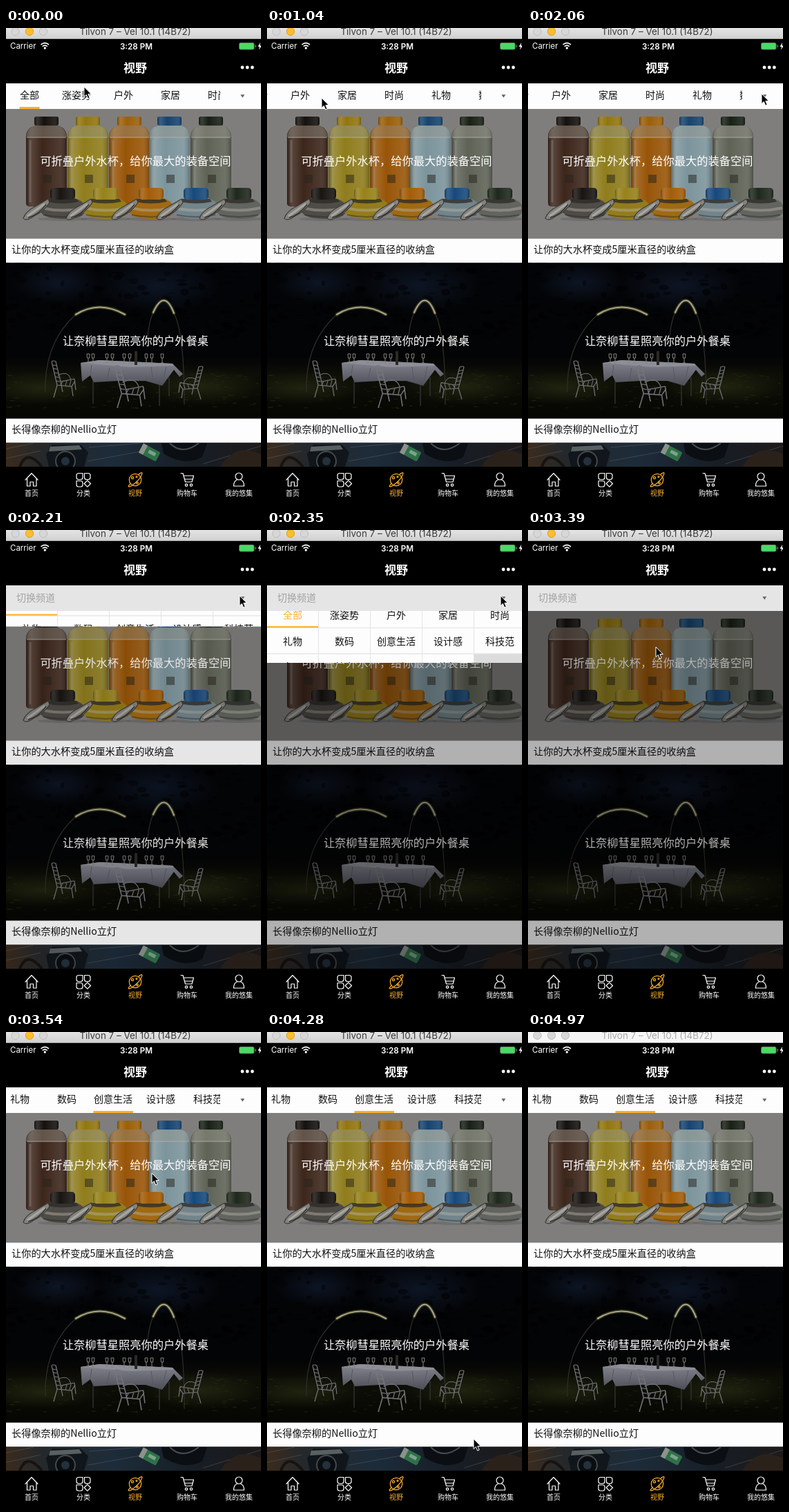
An HTML page for the animation above (4.99 s loop, 369 by 685 pixels).

```html
<!DOCTYPE html>
<html lang="zh-CN">
<head>
<meta charset="utf-8">
<title>视野</title>
<style>
html, body { margin: 0; width: 100%; height: 100%; overflow: hidden; background: #000; }
svg { display: block; width: 369px; height: 685px; }
text { font-family: "Noto Sans CJK SC", "Noto Sans CJK", sans-serif; font-size: 14px; fill: #111; }
.latin { font-family: Inter, Roboto, sans-serif; }
.mid { text-anchor: middle; }
.head { font-size: 16.25px; fill: #fff; text-anchor: middle; }
.cap { font-size: 14.2px; }
.label { font-size: 10px; fill: #fff; text-anchor: middle; }
.line { fill: none; stroke: #fff; stroke-width: 1.2; stroke-linejoin: round; stroke-linecap: round; }
.on { fill: #fbb02d; }
.line.on { fill: none; stroke: #fbb02d; }
</style>
</head>
<body>
<svg viewBox="0 0 369 685" xmlns="http://www.w3.org/2000/svg">
  <defs>
    <linearGradient id="bar" x2="0" y2="1"><stop stop-color="#e4e4e4"/><stop offset="1" stop-color="#cfcfcf"/></linearGradient>
    <linearGradient id="round">
      <stop stop-color="#000" stop-opacity=".3"/><stop offset=".14" stop-color="#fff" stop-opacity=".14"/>
      <stop offset=".4" stop-color="#fff" stop-opacity="0"/><stop offset=".84" stop-color="#fff" stop-opacity=".1"/><stop offset="1" stop-color="#000" stop-opacity=".22"/>
    </linearGradient>
    <linearGradient id="night" x2="0" y2="1">
      <stop stop-color="#030407"/><stop offset=".6" stop-color="#030405"/><stop offset=".72" stop-color="#0d0f07"/><stop offset="1" stop-color="#050602"/>
    </linearGradient>
    <radialGradient id="sky"><stop stop-color="#0d1524"/><stop offset="1" stop-color="#0d1524" stop-opacity="0"/></radialGradient>
    <radialGradient id="lawn"><stop stop-color="#20230f"/><stop offset="1" stop-color="#20230f" stop-opacity="0"/></radialGradient>
    <linearGradient id="cloth" x2="0" y2="1"><stop stop-color="#85868f"/><stop offset="1" stop-color="#4c4e58"/></linearGradient>
    <linearGradient id="desk"><stop stop-color="#3b2b1d"/><stop offset=".14" stop-color="#25282b"/><stop offset=".42" stop-color="#1d2c3a"/><stop offset=".75" stop-color="#171d25"/><stop offset="1" stop-color="#1d1a1a"/></linearGradient>
    <clipPath id="tabClip"><rect y="80" width="310" height="37"/></clipPath>
    <clipPath id="panelClip"><rect id="panelBox" y="117" width="369" height="0"/></clipPath>
    <clipPath id="photo2"><rect y="339" width="369" height="226"/></clipPath>
    <clipPath id="photo3"><rect y="599" width="369" height="35"/></clipPath>
    <g id="chair" fill="none" stroke="#75777c" stroke-width="1.2">
      <path d="M1 1Q3-1 7 1L14 30L34 26M1 1L9 35L30 37L35 29M9 35L4 53M30 37L32 51M14 30L17 45M34 26L36 42"/>
      <path d="M2 6L8 7M3 11L9 12M5 17L11 18M6 23L12 24M8 29L13 30M17 30L14 35M23 29L21 36M29 28L27 36M10 21Q25 13 29 27" stroke-width="1"/>
    </g>
  </defs>

  <g id="titlebar">
    <rect id="barBg" width="369" height="16" fill="url(#bar)"/>
    <path d="M0 15.5H369" stroke="#a9a9a9"/>
    <circle cx="13.5" cy="5" r="5.7" fill="#d7d7d7" stroke="#bdbdbd"/>
    <circle id="amber" cx="34" cy="5" r="5.7" fill="#fdbd2e" stroke="#dfa023"/>
    <circle cx="54" cy="5" r="5.7" fill="#d7d7d7" stroke="#bdbdbd"/>
    <text id="barText" class="latin mid" x="187" y="10" style="font-size:13.4px">Tilvon 7 – Vel 10.1 (14B72)</text>
  </g>

  <rect y="16" width="369" height="64"/>
  <text class="latin" x="6" y="30.3" style="font-size:11.5px;fill:#fff">Carrier</text>
  <g fill="none" stroke="#fff" stroke-width="1.7"><path d="M50.5 24.2Q56.3 19 62 24.2M52.8 26.7Q56.3 23.4 59.8 26.7"/><circle cx="56.3" cy="29" r=".8"/></g>
  <text class="latin mid" x="188.5" y="30.5" style="font-size:11.7px;font-weight:600;fill:#fff">3:28 PM</text>
  <rect x="337.5" y="21.5" width="21.5" height="9.5" rx="2" fill="#4cd964" stroke="#4f7a58"/>
  <path d="M361.2 24.5V28" stroke="#888" stroke-width="1.2"/>
  <path d="M368 21L364.5 27H367L366 31.5L370 25.5H367.5Z" fill="#fff"/>
  <text class="mid" x="187" y="63.7" style="font-size:17px;font-weight:700;fill:#fff">视野</text>
  <g fill="#fff"><circle cx="342" cy="57" r="2.4"/><circle cx="349.200" cy="57" r="2.4"/><circle cx="356.400" cy="57" r="2.4"/></g>

  <rect y="117" width="369" height="188" fill="#7f7e7d"/>
  <g id="bottles"></g>
  <text class="head" x="187.5" y="197.5">可折叠户外水杯，给你最大的装备空间</text>
  <rect y="304.5" width="369" height="35" fill="#fdfdfd"/>
  <text class="cap" x="8" y="324.7">让你的大水杯变成5厘米直径的收纳盒</text>

  <g clip-path="url(#photo2)">
    <rect y="339.5" width="369" height="226" fill="url(#night)"/>
    <ellipse cx="75" cy="368" rx="65" ry="30" fill="url(#sky)"/>
    <ellipse cx="220" cy="372" rx="90" ry="40" fill="url(#sky)"/>
    <ellipse cx="50" cy="520" rx="90" ry="24" fill="url(#lawn)"/>
    <ellipse cx="285" cy="518" rx="90" ry="27" fill="url(#lawn)"/>
    <g id="leaves"></g>
    <g fill="none" stroke-linecap="round">
      <path d="M57 526Q55 455 101 414M205 446Q207 424 213 411M243 412Q258 440 258 544" stroke="#2e2d27" stroke-width="1.3"/>
      <path d="M101 414Q135 393 172 414M213 411Q229 376 243 412" stroke="#5d5a36" stroke-width="5" opacity=".5"/>
      <path d="M101 414Q135 393 172 414M213 411Q229 376 243 412" stroke="#a9a680" stroke-width="2.2"/>
    </g>
    <path d="M126 508V543M222 512V546M236 505V532" stroke="#2e2f2e" stroke-width="1.6"/>
    <use href="#chair" x="65" y="481"/>
    <use href="#chair" transform="translate(286 489) scale(-1 .9)"/>
    <path d="M108 484L135 480L241 485L256 500L251 504L243 494L226 517L202 510L160 510L127 512L122 502L110 511Z" fill="url(#cloth)"/>
    <path d="M108 484L135 480L241 485L243 488L180 490Z" fill="#8d8e97"/>
    <path d="M150 491L146 509M210 490L213 511M232 489L226 515M124 487L122 501" stroke="#555762"/>
    <g id="glasses" stroke="#85857f" fill="none" stroke-width="1"></g>
    <path d="M188 467V487" stroke="#2c2925" stroke-width="4"/>
    <use href="#chair" transform="translate(156 488) scale(1.25 1.15)"/>
  </g>
  <text class="head" x="187.5" y="457.5">让奈柳彗星照亮你的户外餐桌</text>
  <rect y="564.5" width="369" height="35" fill="#fdfdfd"/>
  <text class="cap" x="8" y="584.7">长得像奈柳的Nellio立灯</text>

  <g clip-path="url(#photo3)">
    <rect y="599.5" width="369" height="35" fill="url(#desk)"/>
    <path d="M0 608L40 600M0 622L50 611M120 606L195 600M118 626L200 611M285 630L369 604" stroke="#5b6066" opacity=".5"/>
    <path d="M58 616L67 602H108L119 613L113 634H62Z" fill="#10161b"/>
    <path d="M64 605L106 603L110 609L62 612Z" fill="#596062"/>
    <circle cx="86" cy="626" r="14" fill="#0b0e11" stroke="#43494c" stroke-width="2"/><circle cx="86" cy="626" r="6" fill="#24313c"/>
    <path d="M20 634Q30 607 52 634" fill="none" stroke="#171311" stroke-width="4"/>
    <g transform="rotate(28 208 613)"><rect x="194" y="606" width="28" height="15" rx="2" fill="#2f7048"/><rect x="194" y="606" width="7" height="15" fill="#8d928b"/><rect x="206" y="610" width="11" height="5" fill="#7ba38a"/></g>
    <path d="M225 600H291L284 620Q258 634 228 615Z" fill="#0b0e12"/>
    <path d="M237 600Q255 618 279 600" fill="none" stroke="#474d50" stroke-width="2"/>
    <path d="M310 634Q332 598 369 616V634Z" fill="#2b211b"/>
  </g>

  <rect id="dim" y="117" width="369" height="517" opacity="0"/>

  <rect y="80" width="369" height="37" fill="#fdfdfd"/>
  <g clip-path="url(#tabClip)"><g id="tabs"><g id="tabNames"></g><rect id="mark" y="114" height="3" fill="#fbb02d"/></g></g>
  <g id="panelHead">
    <rect y="80" width="369" height="37" fill="#e5e5e5"/>
    <text x="15" y="103.200" style="fill:#a3a3a3">切换频道</text>
  </g>
  <path d="M339.300 96.300H345.300L342.300 100.800Z" fill="#666"/>
  <g clip-path="url(#panelClip)"><g id="grid"></g></g>

  <rect y="634" width="369" height="51"/>
  <g class="line">
    <path d="M28 653L37 643.5L46 653M30.5 651V662H35V656H39.5V662H44V651"/>
    <path d="M105 643.5H111V649.5A3 3 0 0 1 108 652.5H105A3 3 0 0 1 102 649.5V646.5A3 3 0 0 1 105 643.5M113.5 643.5H119A3 3 0 0 1 122 646.5V649.5A3 3 0 0 1 119 652.5H116.5A3 3 0 0 1 113.5 649.5ZM102 654.5H108A3 3 0 0 1 111 657.5V660A3 3 0 0 1 108 663H105A3 3 0 0 1 102 660ZM117.8 653.8L122.5 658.5L117.8 663.2L113.2 658.5Z"/>
    <path d="M253 643.5H256L259.5 656H269L271.5 647H257.2M258.3 652H270"/><circle cx="261" cy="660.5" r="1.7"/><circle cx="268" cy="660.5" r="1.7"/>
    <circle cx="337" cy="648" r="5"/><path d="M334 653Q329.5 655 329.5 662H344.5Q344.5 655 340 653"/>
  </g>
  <g class="line on"><circle cx="187" cy="653" r="8.700"/><path d="M180 658.5C174 664 178 665 187 657.5S199 641 195.5 642.8Q194 643.2 192 645"/><circle cx="183" cy="650" r="1.6"/><circle cx="189" cy="648.5" r="1"/><circle cx="190" cy="657.5" r="1.3"/></g>
  <g id="labels"></g>
  <path id="cursor" d="M0 0V14.5L3.3 11.4L5.7 17L8.2 16L5.8 10.5H10.3Z" fill="#000" stroke="#fff" stroke-width="1"/>
</svg>
<script>
const $ = id => document.getElementById(id);
const clamp = v => Math.max(0, Math.min(1, v));
const set = (id, attrs) => { for (const k in attrs) $(id).setAttribute(k, attrs[k]); };
const fill = (id, items, draw) => { $(id).innerHTML = items.map(draw).join(''); };

// bottles: left edge, body, cap, then folded centre, body, cap
const bottles = [
  [29, '#3d261b', '#15110e', 82, '#4f4b46', '#171411'],
  [89, '#8f7d1d', '#92760f', 144, '#937c1c', '#97821a'],
  [149, '#985508', '#9b600a', 210, '#a06a12', '#a35d08'],
  [207, '#7c949c', '#17446f', 275, '#73858b', '#17497c'],
  [267, '#5f6356', '#182015', 337, '#62645f', '#1f281c']
];
const tall = ([x, body, cap]) => {
  const d = `M${x + 14} 141h31q14 3 14 17v95q0 5-6 5h-47q-6 0-6-5v-95q0-14 14-17z`;
  return `<path d="${d}" fill="${body}"/><path d="${d}" fill="url(#round)"/>
    <path d="M${x + 14} 141h31q12 3 14 16h-59q2-13 14-16z" fill="#9a9890" opacity=".4"/>
    <path d="M${x + 1} 158h57" stroke="#b0ada4" opacity=".55" stroke-width="2"/>
    <path d="M${x + 6} 162v90" stroke="#a9a69d" opacity=".3" stroke-width="3"/>
    <rect x="${x + 12}" y="128" width="35" height="13" rx="3" fill="${cap}"/>
    <rect x="${x + 12}" y="128" width="35" height="13" rx="3" fill="url(#round)"/>
    <rect x="${x + 25}" y="212" width="12" height="12" fill="#26241c" opacity=".5"/>`;
};
const folded = ([, , , x, body, cap]) => `
  <ellipse cx="${x}" cy="276" rx="36" ry="3" fill="#555" opacity=".35"/>
  <path d="M${x - 17} 246Q${x - 33} 250 ${x - 33} 263Q${x - 31} 275 ${x} 276T${x + 33} 263Q${x + 33} 250 ${x + 17} 246Z" fill="${body}"/>
  <path d="M${x - 31} 260q31 7 62 0" fill="none" stroke="#b5b2a8" opacity=".45" stroke-width="4"/>
  <path d="M${x - 28} 270q28 6 56 0" fill="none" stroke="#222" opacity=".4" stroke-width="2"/>
  <path d="M${x - 20} 247h40l3 4q-23 5-46 0z" fill="#2a2925" opacity=".75"/>
  <rect x="${x - 18}" y="231" width="36" height="17" rx="5" fill="${cap}"/>
  <rect x="${x - 18}" y="231" width="36" height="17" rx="5" fill="url(#round)"/>
  <path d="M${x - 57} 275Q${x - 54} 265 ${x - 38} 257L${x - 21} 247L${x - 19} 252Q${x - 27} 265 ${x - 42} 272Q${x - 53} 280 ${x - 57} 275Z" fill="#85837e" stroke="#3b3a37" stroke-width="1.2"/>
  <path d="M${x - 51} 272L${x - 26} 254" stroke="#a8a7a2" stroke-width="3"/>
  <path d="M${x - 50} 274Q${x - 35} 270 ${x - 24} 255" fill="none" stroke="#33312f" stroke-width="1.4"/>`;
$('bottles').innerHTML = bottles.map(tall).join('') + bottles.map(folded).join('');

// dark foliage and grass
let seed = 7;
const rnd = () => (seed = seed * 16807 % 2147483647) / 2147483647;
fill('leaves', Array(260).fill(0), (_, i) => {
  const grass = i > 150, x = rnd() * 369, y = grass ? 500 + rnd() * 50 : 339 + rnd() * 110;
  return `<ellipse cx="${x}" cy="${y}" rx="${2 + rnd() * (grass ? 3 : 7)}" ry="${grass ? 0.7 : 1 + rnd() * 4}" fill="${grass ? '#282a10' : '#010204'}" opacity="${0.3 + rnd() * 0.4}"/>`;
});
fill('glasses', [119, 126, 146, 154, 171, 179, 203, 211, 226], x =>
  `<path d="M${x - 2} 471h4l-.5 6h-3zM${x} 477v7m-2 0h4"/>`);

const names = ['全部', '涨姿势', '户外', '家居', '时尚', '礼物', '数码', '创意生活', '设计感', '科技范', '文具', '美食', '运动', '旅行'];
const tabX = [20, 81, 156, 224, 292, 360, 428, 481, 557, 625];
fill('tabNames', tabX, (x, i) => `<text x="${x}" y="102.3">${names[i]}</text>`);

const cell = 75, row = 37.5;
const drawGrid = on => fill('grid', Array.from({ length: 15 }, (_, i) => i), i => {
  const x = i % 5 * cell, y = 117 + Math.floor(i / 5) * row;
  return `<rect x="${x - .5}" y="${y - .5}" width="${cell}" height="${row}" fill="${names[i] ? '#fdfdfd' : '#dcdcdc'}" stroke="#e3e3e3"/>` +
    (names[i] ? `<text class="mid${i === on ? ' on' : ''}" x="${x + 37}" y="${y + 23.8}">${names[i]}</text>` : '') +
    (i === on ? `<rect x="${x}" y="${y + row - 3}" width="${cell - 1}" height="3" fill="#fbb02d"/>` : '');
});
fill('labels', ['首页', '分类', '视野', '购物车', '我的悠集'], (s, i) =>
  `<text class="label${i === 2 ? ' on' : ''}" x="${37 + i * cell}" y="675.800">${s}</text>`);

// screen updates: time, pointer x, pointer y
const steps = [
  [0, 113, 85], [150, 117, 92], [300, 114, 97], [450, 104, 99], [600, 90, 100], [740, 82, 100], [890, 79, 101], [1040, 79, 101], [1180, 79, 100],
  [1330, 83, 101], [1480, 112, 103], [1620, 182, 104], [1770, 264, 102], [1920, 322, 97], [2060, 338, 95],
  [2210, 338, 95], [2350, 338, 95], [2500, 330, 98], [2640, 277, 124], [2790, 212, 158], [2940, 185, 169],
  [3240, 185, 169], [3390, 185, 169], [3540, 211, 204], [3690, 284, 486],
  [3990, 290, 530], [4140, 299, 588], [4290, 310, 636], [4430, 321, 669], [4580, 330, 700], [4970, 330, 700]
];
const loop = 4990;
let shown = -1;

function draw([t, x, y]) {
  const open = t >= 2210 && t < 3540, picked = t >= 3540, idle = t >= 4970;
  const drag = clamp((t - 250) / 790);
  const scroll = picked ? 354 : 122 * (1 - (1 - drag) ** 2);
  const p = t < 3000 ? clamp((t - 2150) / 300) : 1 - clamp((t - 3140) / 250);

  set('tabs', { transform: `translate(${-scroll})` });
  set('mark', picked ? { x: 480.5, width: 57.5 } : { x: 19.5, width: 29 });
  set('panelHead', { opacity: open ? 1 : 0 });
  set('dim', { opacity: open ? 0.3 * clamp((t - 2150) / 200) : 0 });
  drawGrid(t < 3240 ? 0 : 7);
  set('panelBox', { height: open ? 3 * row * p : 0 });
  set('grid', { transform: `translate(0 ${-row * (1 - p)})` });
  set('cursor', { transform: `translate(${x} ${y})` });
  set('barBg', { fill: idle ? '#f6f6f6' : 'url(#bar)' });
  set('amber', idle ? { fill: '#d7d7d7', stroke: '#bdbdbd' } : { fill: '#fdbd2e', stroke: '#dfa023' });
  $('barText').style.fill = idle ? '#a8a8a8' : '#3a3a3a';
}

const start = performance.now();
function tick() {
  const t = (performance.now() - start) % loop;
  const n = steps.filter(s => s[0] <= t).length - 1;
  if (n !== shown) draw(steps[shown = n]);
  requestAnimationFrame(tick);
}
tick();
</script>
</body>
</html>
```
